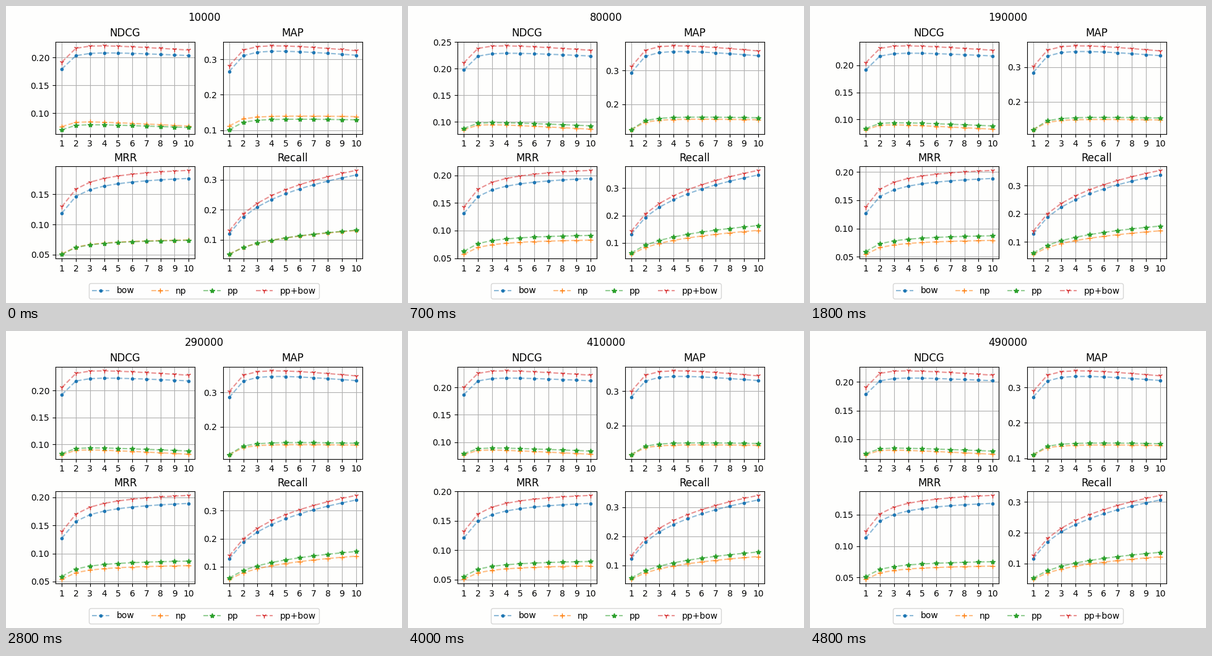
A matplotlib script for the animation above (6.3 s loop, 640 by 480 pixels).

```python
import numpy as np
import matplotlib.pyplot as plt
from matplotlib.animation import FuncAnimation

STEPS, FRAMES, INTERVAL = 49, 63, 100
RANKS = np.arange(1, 11)
PAPER = "#fefefd"
STYLES = {"bow": ("C0", "."), "np": ("C1", "+"), "pp": ("C2", "*"), "pp+bow": ("C3", "1")}


def level(step):
    """Overall score: quick rise, long plateau, late decline."""
    return np.interp(step, [0, 7, 18, 35, 44, 48], [0.937, 1.032, 1, 1.006, 0.945, 0.9235])


def share(name, step):
    """Weight of the phrase-only series, which slowly lose ground."""
    if "bow" in name:
        return 1
    start = 0.905 if name == "pp" else 1.005
    return np.interp(step, [0, 7, 48], [start, 1.018, 0.966])


class Panel:
    """A score at rank 1 that grows as a power law of the rank, less a linear fall.

    Each series is given as (ratio to the base score, gain, fall per rank).
    """

    def __init__(self, ax, title, base, power, drift, **series):
        self.ax, self.base, self.drift = ax, base, drift
        growth = (1 - RANKS ** -power) / power
        self.curves, self.lines = {}, {}
        for (name, (color, marker)), (ratio, gain, fall) in zip(STYLES.items(), series.values()):
            self.curves[name] = ratio * (1 + gain * growth - fall * (RANKS - 1))
            self.lines[name], = ax.plot(RANKS, RANKS, "--", marker=marker, label=name,
                                        color=(color, 0.5), mfc=color, mec=color)
        ax.set_title(title)
        ax.set_xticks(RANKS)
        ax.set_facecolor(PAPER)
        ax.grid(True)

    def show(self, step):
        late = np.interp(step, [30, 48], [0, 1])
        scale = self.base * level(step) * (1 + self.drift * late)
        for name, line in self.lines.items():
            line.set_ydata(scale * share(name, step) * self.curves[name])
        self.ax.relim()
        self.ax.autoscale_view()


fig, axes = plt.subplots(2, 2, figsize=(6.4, 4.8), dpi=100, facecolor=PAPER)
fig.subplots_adjust(left=0.125, right=0.9, bottom=0.15, top=0.88, wspace=0.2, hspace=0.35)

panels = [
    Panel(axes[0, 0], "NDCG", base=0.2047, power=1.75, drift=0.009,
          bow=(0.9355, 0.345, 0.0067), np=(0.3955, 0.295, 0.0171),
          pp=(0.407, 0.311, 0.0133), both=(1, 0.341, 0.0089)),
    Panel(axes[0, 1], "MAP", base=0.3011, power=1.3, drift=0.04,
          bow=(0.9436, 0.392, 0.0128), np=(0.3945, 0.406, 0.0068),
          pp=(0.396, 0.482, 0.0083), both=(1, 0.374, 0.0136)),
    Panel(axes[1, 0], "MRR", base=0.1383, power=0.72, drift=-0.033,
          bow=(0.917, 0.432, 0), np=(0.393, 0.399, 0),
          pp=(0.430, 0.410, 0), both=(1, 0.414, 0)),
    Panel(axes[1, 1], "Recall", base=0.138, power=-0.07, drift=-0.015,
          bow=(0.924, 0.658, 0), np=(0.401, 0.601, 0),
          pp=(0.436, 0.631, 0), both=(1, 0.625, 0)),
]

heading = fig.suptitle("")
fig.legend(handles=list(panels[0].lines.values()), loc="lower center", ncol=len(STYLES))


def update(frame):
    step = min(frame, STEPS - 1)
    heading.set_text(str(10000 * (step + 1)))
    for panel in panels:
        panel.show(step)


anim = FuncAnimation(fig, update, frames=FRAMES, interval=INTERVAL,
                     init_func=lambda: update(0), repeat=True, repeat_delay=0)
plt.show()
```
